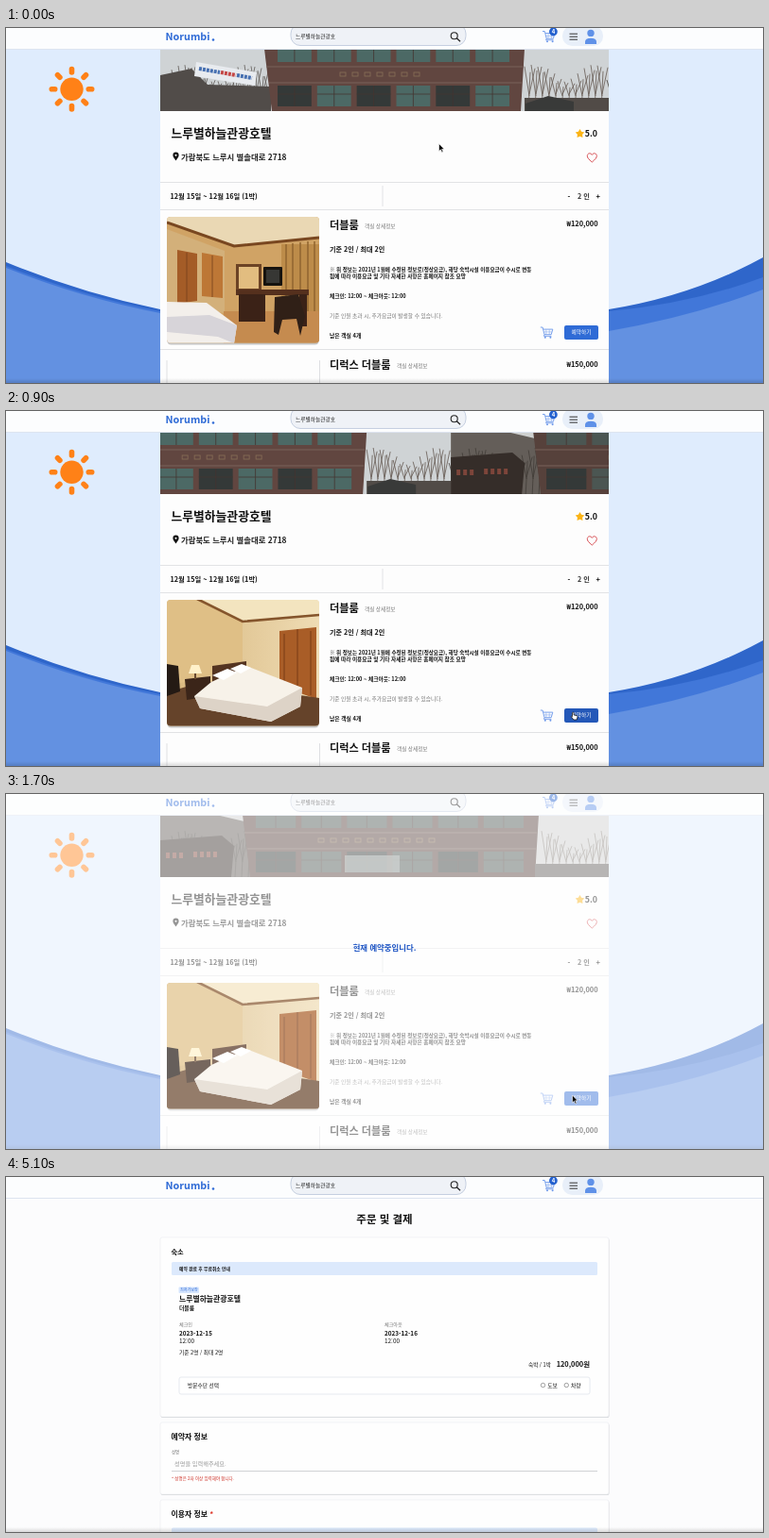
An HTML page for the animation above (5.5 s loop, 800 by 376 pixels).

```html
<!DOCTYPE html>
<html lang="ko">
<head>
<meta charset="utf-8">
<style>
html, body { margin: 0; width: 100%; height: 100%; overflow: hidden; background: #fff; }
svg { display: block; width: 100%; height: 100%; }
text { font-family: "Noto Sans CJK KR", "Noto Sans CJK", "Noto Sans CJK JP", sans-serif; }
</style>
</head>
<body>
<svg id="stage" viewBox="0 0 800 376" preserveAspectRatio="none"></svg>
<script>
const LOOP = 5500, STEP = 100;
const HOTEL = '느루별하늘관광호텔', ADDRESS = '가람북도 느루시 별솔대로 2718';
const BLUE = '#2f6bd6';

// y is the visual middle of the line
const text = (x, y, str, size, weight = 400, fill = '#111', anchor = 'start') =>
  `<text x="${x}" y="${y + size * 0.37}" font-size="${size}" font-weight="${weight}" fill="${fill}" text-anchor="${anchor}">${str}</text>`;
const rect = (x, y, w, h, fill, more = '') =>
  `<rect x="${x}" y="${y}" width="${w}" height="${h}" fill="${fill}" ${more}/>`;
const poly = (points, fill) => `<polygon points="${points}" fill="${fill}"/>`;
const line = (d, stroke, width = 1, more = '') =>
  `<path d="${d}" fill="none" stroke="${stroke}" stroke-width="${width}" ${more}/>`;
const disc = (x, y, r, fill, more = '') => `<circle cx="${x}" cy="${y}" r="${r}" fill="${fill}" ${more}/>`;

const cart = (x, y, color) => `<g transform="translate(${x} ${y})">` +
  line('M0 .5H2.3L4.2 8.2H11.4L13 2.6H3M4.2 8.2L3.6 9.8H11.6', color, 0.9, 'stroke-linejoin="round"') +
  line('M3.6 5.4H12M6 3V8M9.4 3V8', color, 0.5) +
  disc(5, 11.2, 1, color) + disc(10.6, 11.2, 1, color) + '</g>';

function star(cx, cy, r) {
  const pts = Array.from({ length: 10 }, (_, i) => {
    const a = (i * 36 - 90) * Math.PI / 180, k = i % 2 ? r * 0.55 : r;
    return `${(cx + k * Math.cos(a)).toFixed(2)},${(cy + k * Math.sin(a)).toFixed(2)}`;
  });
  return poly(pts.join(' '), '#fbb416');
}

function sun() {
  let rays = '';
  for (let a = 0; a < 360; a += 45)
    rays += line('M17.8 0H21.2', '#ff8117', 5.6, `stroke-linecap="round" transform="rotate(${a})"`);
  return `<g transform="translate(69.5 64.8)">${disc(0, 0, 12.2, '#ff8117')}${rays}</g>`;
}

const scenery = () =>
  rect(0, 0, 800, 376, '#dfecfd') +
  '<path d="M0 248Q80 281 163 298H637Q725 284 800 243V376H0Z" fill="#2f66ca"/>' +
  '<path d="M0 252Q80 284 163 300H637Q725 292 800 264V376H0Z" fill="#4177d9"/>' +
  '<path d="M0 254Q80 286 163 302V376H0ZM637 321Q725 306 800 277V376H637Z" fill="#6391e1"/>' +
  sun();

function trees(x0, x1, color) {
  let d = '';
  for (let x = x0; x < x1; x += 7) {
    const h = 12 + 9 * Math.sin(x * 1.7);
    d += `M${x} 88L${x + 2} ${66 - h}M${x + 1} 70L${x + 7} ${62 - h}M${x + 1} 72L${x - 4} ${60 - h}`;
  }
  return line(d, color, 0.8);
}

function facade(left, right, wall, glass) {
  let s = poly(`${left},22 ${right},22 ${right - 4},88 ${left + 8},88`, wall);
  const pitch = (right - left - 24) / 6, w = pitch - 6;
  for (let i = 0; i < 6; i++) {
    const x = left + 14 + i * pitch;
    s += rect(x, 22, w, 14, glass) + rect(x, 61, w, 22, i % 2 ? glass : '#343938') +
      line(`M${x + w / 2} 22V36M${x + w / 2} 61V83M${x} 70H${x + w}`, '#443531', 0.8);
  }
  s += line(`M${left + 2} 41H${right - 2}M${left + 5} 58H${right - 3}`, '#79625a', 1);
  for (let x = left + 80; x < right - 110; x += 13)
    s += rect(x, 47, 6, 4, 'none', 'stroke="#846a55" stroke-width=".9"');
  return s;
}

const frontA = () =>
  rect(163, 22, 474, 66, '#cfd3d5') + trees(165, 280, '#605b57') +
  poly('163,50 196,43 213,60 280,62 280,88 163,88', '#514c49') +
  facade(273, 548, '#614640', '#4c6965') +
  poly('201,36 265,47 263,61 199,51', '#e8ebef') +
  line('M204 43L226 47M244 50L260 53', '#4770b1', 4, 'stroke-dasharray="3 1"') +
  line('M227 47L243 50', '#c54846', 4, 'stroke-dasharray="3 1"') +
  trees(552, 634, '#665b53') + rect(548, 74, 89, 14, '#514b47') +
  poly('549,80 573,72 600,78 600,88 549,88', '#393a39');

const frontB = () =>
  rect(163, 22, 474, 66, '#ced0cf') + poly('163,22 222,22 256,30 260,88 163,88', '#645e59') +
  trees(165, 264, '#423d38') + poly('163,49 228,44 241,55 238,88 163,88', '#352d29') +
  line('M169 65H190M198 64H226', '#7d453a', 6, 'stroke-dasharray="4 3"') +
  facade(250, 563, '#56413b', '#4b5652') +
  rect(358, 65, 58, 18, '#929d98', 'opacity=".75"') +
  trees(570, 634, '#817871') + rect(559, 74, 78, 14, '#605c58');

const roomA = () =>
  rect(170, 200, 161, 134, '#d0a365') + poly('170,200 331,200 331,222 241,231 170,207', '#ead8b4') +
  line('M170 206L241 231L331 222', '#794720', 3) +
  poly('170,213 231,236 231,302 170,292', '#d3b07a') +
  poly('181,235 202,239 202,289 181,292', '#a45c27') +
  poly('207,238 229,242 229,286 207,284', '#bd7736') +
  line('M191 238V290M218 241V285', '#75401d', 0.8) +
  rect(291, 229, 40, 78, '#bd8c4a') +
  line('M296 229V306M303 228V306M311 227V306M319 226V306M326 226V306', '#91652f', 1.5) +
  poly('230,300 331,300 331,334 230,334', '#c58b4f') +
  rect(243, 250, 27, 28, '#6c4325') + rect(246, 253, 21, 23, '#e2bd80') +
  rect(243, 277, 77, 6, '#55301d') + rect(246, 282, 28, 29, '#3b2217') + rect(310, 282, 8, 34, '#3b2217') +
  rect(272, 253, 20, 20, '#16130f', 'rx="1"') + rect(275, 256, 14, 14, '#373734') +
  poly('284,285 309,282 316,305 311,326 307,308 292,309 288,325 283,322', '#302017') +
  poly('170,290 212,291 244,315 241,334 170,334', '#f3efeb') +
  poly('170,306 215,304 244,315 241,334 224,327 170,322', '#d7d4d9');

const roomB = () =>
  rect(170, 200, 161, 134, 'url(#wall)') + poly('202,200 331,200 331,216 250,223', '#f3e4bf') +
  poly('170,200 202,200 250,223 250,270 170,292', '#dfbf86') +
  line('M202 199L250 223L331 216', '#85552c', 2.6) +
  poly('289,233 328,229 328,305 289,291', '#a95d27') +
  line('M308 231V298M294 236V289M322 233V301', '#793c17', 1) +
  poly('170,298 211,286 331,304 331,334 170,334', '#65432a') +
  poly('170,268 182,270 184,297 170,302', '#241a14') +
  poly('189,284 216,281 216,302 191,306', '#3b2519') +
  poly('196,269 204,269 207,278 193,278', '#fff1ca') + rect(199, 278, 2, 6, '#67492f') +
  poly('218,270 254,265 254,278 218,288', '#543421') +
  poly('217,287 254,270 313,293 311,313 280,329 205,315 199,302', '#f7f2e9') +
  poly('199,302 276,313 313,293 311,313 280,329 205,315', '#ddd3c7') +
  poly('218,280 234,273 244,277 230,285', '#fff') + poly('237,273 249,268 259,272 248,278', '#fff');

const carousel = (id, x, y, w, h, r, a, b) =>
  `<clipPath id="${id}Clip"><rect x="${x}" y="${y}" width="${w}" height="${h}" rx="${r}"/></clipPath>` +
  `<g clip-path="url(#${id}Clip)"><g id="${id}">${a}<g transform="translate(${w})">${b}</g></g></g>`;

const hotelPage = () => scenery() +
  rect(163, 22, 474, 354, '#fdfdfd') +
  carousel('front', 163, 22, 474, 66, 0, frontA(), frontB()) +
  text(174.5, 111.5, HOTEL, 12.8, 700) +
  '<path d="M179.5 140.5C177 137 176.4 136 176.4 134.7A3.1 3.1 0 0 1 182.6 134.7C182.6 136 182 137 179.5 140.5Z" fill="#111"/>' +
  disc(179.5, 134.7, 1, '#fff') +
  text(185, 136.5, ADDRESS, 8.4, 700, '#222') +
  star(606.5, 112, 5) + text(625, 112, '5.0', 8.8, 700, '#111', 'end') +
  line('M619.3 142C616 139.2 614.3 137.5 614.3 135.5C614.3 132.5 618 131.8 619.3 134.4C620.6 131.8 624.3 132.5 624.3 135.5C624.3 137.5 622.6 139.2 619.3 142Z', '#d74d52') +
  line('M163 163.5H637M163 192.5H637M398 167V189', '#e2e3e5') +
  text(173.5, 178, '12월 15일 ~ 12월 16일 (1박)', 7.3, 700) +
  text(593.5, 178, '-', 7.5, 700) + text(604, 178, '2 인', 7.2, 700, '#333') + text(623.5, 178, '+', 7.5, 700) +
  rect(170.5, 202, 160, 133.5, '#999', 'rx="4" opacity=".55"') +
  carousel('room', 170, 200, 161, 133.5, 4, roomA(), roomB()) +
  text(342, 209, '더블룸', 11.2, 700) + text(379, 210, '객실 상세정보', 5.6, 400, '#777') +
  text(625.5, 207.5, '₩120,000', 7.4, 700, '#111', 'end') +
  text(342, 234, '기준 2인 / 최대 2인', 7.1, 700) +
  text(342, 255.5, '※ 위 정보는 2021년 1월에 수정된 정보로(정상요금), 해당 숙박시설 이용요금이 수시로 변동', 5.55, 700) +
  text(342, 263, '됨에 따라 이용요금 및 기타 자세한 사항은 홈페이지 참조 요망', 5.65, 700) +
  text(342, 284, '체크인: 12:00 ~ 체크아웃: 12:00', 5.7, 700) +
  text(342, 304.5, '기준 인원 초과 시, 추가요금이 발생할 수 있습니다.', 5.7, 400, '#777') +
  text(342, 326, '남은 객실 4개', 5.8, 700) +
  cart(564.8, 316.5, '#6c98ea') +
  rect(590, 315, 36, 15, BLUE, 'rx="2" id="book"') +
  text(608, 322.3, '예약하기', 5.7, 400, '#fff', 'middle') +
  line('M163 340.5H637', '#e1e2e4') +
  line('M170 352V376M331.5 352V376', '#dedfe2') +
  text(342, 357, '디럭스 더블룸', 11.1, 700) + text(413, 358, '객실 상세정보', 5.6, 400, '#777') +
  text(625.5, 356, '₩150,000', 7.4, 700, '#111', 'end');

const card = (y, h) =>
  rect(163.5, y + 1, 474, h, '#d4d6da', 'rx="2"') +
  rect(163, y, 474, h, '#fefefe', 'rx="2" stroke="#eceef1" stroke-width=".7"');

const stay = (x, label, date) =>
  text(x, 156.5, label, 5.1, 400, '#777') + text(x, 165.3, date, 6.4, 700) + text(x, 174, '12:00', 6.4);

const radio = (x, label) =>
  disc(x, 220.5, 2.2, '#fff', 'stroke="#777" stroke-width=".7"') + text(x + 4.7, 221, label, 5.8, 500);

const orderPage = () => rect(0, 0, 800, 376, '#fcfcfd') +
  text(400, 45, '주문 및 결제', 11.5, 700, '#111', 'middle') +
  card(64, 190) + text(174.5, 79, '숙소', 7.2, 700) +
  rect(175, 90, 450, 14, '#dce9fc', 'rx="1.5"') + text(183, 97, '예약 완료 후 무료취소 안내', 4.8, 700) +
  rect(182.5, 116.5, 21.5, 6.5, '#d5e5fd', 'rx="1"') + text(184, 119.7, '최저가보장', 4.1, 500, BLUE) +
  text(183, 129.5, HOTEL, 7.85, 700) + text(183, 138.7, '더블룸', 5.8, 700) +
  stay(183, '체크인', '2023-12-15') + stay(400, '체크아웃', '2023-12-16') +
  text(183, 186, '기준 2명 / 최대 2명', 5.7, 500) +
  text(552, 199, '숙박 / 1박', 5.6) + text(617, 198.5, '120,000원', 7.4, 700, '#111', 'end') +
  rect(183, 212, 434, 18, '#fff', 'rx="2" stroke="#e4e7ee" stroke-width=".9"') +
  text(192, 221, '방문수단 선택', 5.7, 500) + radio(567.5, '도보') + radio(592.3, '차량') +
  card(260, 76) + text(174.5, 275, '예약자 정보', 7.9, 700) +
  text(175, 291, '성명', 4.4, 400, '#666') +
  text(178, 303.3, '성명을 입력해주세요.', 6.2, 400, '#999') +
  line('M175 311.5H625', '#d0d2d5') +
  text(175, 319.7, '* 성명은 2자 이상 입력해야 합니다.', 4.5, 400, '#cc2b21') +
  card(342, 60) + text(174.5, 357, '이용자 정보 <tspan fill="#dd3326">*</tspan>', 7.9, 700) +
  rect(175, 371.5, 450, 6, '#dce9fc', 'rx="1.5"');

const topBar = () =>
  rect(0, 0, 800, 22, '#fcfdfe') + line('M0 22.5H800', '#dde4f0') +
  text(168.5, 8.5, 'Norumbi', 10.8, 700, BLUE) + disc(219, 12.5, 1.3, BLUE) +
  rect(301, -4, 185, 22.5, '#eff2f7', 'rx="10" stroke="#c5cfe0"') +
  text(306, 9.3, HOTEL.slice(0, -1), 5.7, 500, '#222') +
  disc(473.7, 8.2, 3.5, 'none', 'stroke="#222" stroke-width="1.1"') + line('M476.3 10.8L480 14.3', '#222', 1.3) +
  cart(567, 3, '#6c98ea') +
  disc(578.4, 3.8, 4.4, '#2461cf') + text(578.4, 3.8, '4', 6, 700, '#fff', 'middle') +
  rect(588, -2, 43, 21, '#e8eff9', 'rx="10"') +
  line('M595.5 6.2H604M595.5 9.2H604M595.5 12.2H604', '#333', 1) +
  disc(618, 5.4, 3.7, '#5f91e8') + '<path d="M612 17V14.5Q612 10.7 618 10.7T624 14.5V17Z" fill="#5f91e8"/>';

const notice = () => '<g id="notice">' +
  '<path d="M0 0H800V376H0ZM170 200V333.5H331V200Z" fill="#fff" fill-rule="evenodd" opacity=".55"/>' +
  rect(170, 200, 161, 133.5, '#fff', 'rx="4" opacity=".3"') +
  text(400, 163.3, '현재 예약중입니다.', 8.4, 700, '#1e55c4', 'middle') + '</g>';

const pointer = () => '<g id="pointer">' +
  '<path id="arrow" d="M0 0V8L1.9 6.3L3.2 9.2L4.5 8.6L3.2 5.8H5.6Z" fill="#000" stroke="#fff" stroke-width=".6"/>' +
  '<path id="hand" d="M0 .6Q.8-.4 1.6.6V3L4.8 3.6Q5.6 4 5.4 5.2L4.8 8H1.3L-1.2 4.7Q-.9 3.6 0 4.6Z" fill="#fff" stroke="#000" stroke-width=".7"/></g>';

document.getElementById('stage').innerHTML =
  '<defs><linearGradient id="dim" x2="0" y2="1"><stop offset="0" stop-opacity="0"/><stop offset="1" stop-opacity=".14"/></linearGradient>' +
  '<linearGradient id="wall"><stop offset="0" stop-color="#d6b57c"/><stop offset="1" stop-color="#efdcb4"/></linearGradient></defs>' +
  `<g id="hotel">${hotelPage()}</g><g id="order">${orderPage()}</g>` +
  topBar() + rect(0, 371, 800, 5, 'url(#dim)') +
  rect(795.2, -3, 4, 158, '#b8b8bb', 'rx="2" id="bar"') + notice() + pointer();

const $ = id => document.getElementById(id);
const show = (id, on) => $(id).setAttribute('visibility', on ? 'visible' : 'hidden');
const place = (id, x, y) => $(id).setAttribute('transform', `translate(${x.toFixed(2)} ${y.toFixed(2)})`);
const progress = (t, a, b) => {
  const p = Math.min(1, Math.max(0, (t - a) / (b - a)));
  return p * p * (3 - 2 * p);
};

// time, x, y of the pointer tip
const TRACK = [[0, 457.5, 122.5], [100, 457.5, 122.5], [700, 595, 309], [900, 598.5, 319],
  [1800, 598.5, 319], [2300, 460, 199], [3500, 460, 199], [3900, 460, 196.5], [LOOP, 460, 196.5]];

function pointerAt(t) {
  const i = TRACK.findIndex(k => k[0] > t);
  const [t0, x0, y0] = TRACK[i - 1], [t1, x1, y1] = TRACK[i];
  const p = progress(t, t0, t1);
  return [x0 + (x1 - x0) * p, y0 + (y1 - y0) * p];
}

function draw(t) {
  const ordering = t >= 1800, hover = t >= 900 && t < 1400;
  show('hotel', !ordering);
  show('order', ordering);
  show('notice', t >= 1400 && !ordering);
  show('bar', ordering && t < 2500);
  $('bar').setAttribute('opacity', t < 2400 ? 1 : 0.4);
  place('room', -161 * progress(t, 0, 600), 0);
  place('front', -474 * progress(t, 700, 1200), 0);
  $('book').setAttribute('fill', hover ? '#2458b8' : BLUE);
  place('pointer', ...pointerAt(t));
  show('arrow', !hover && t < 5000);
  show('hand', hover);
}

const start = performance.now();
function tick() {
  const t = (performance.now() - start) % LOOP;
  draw(Math.floor(t / STEP) * STEP);
  requestAnimationFrame(tick);
}
tick();
</script>
</body>
</html>
```
